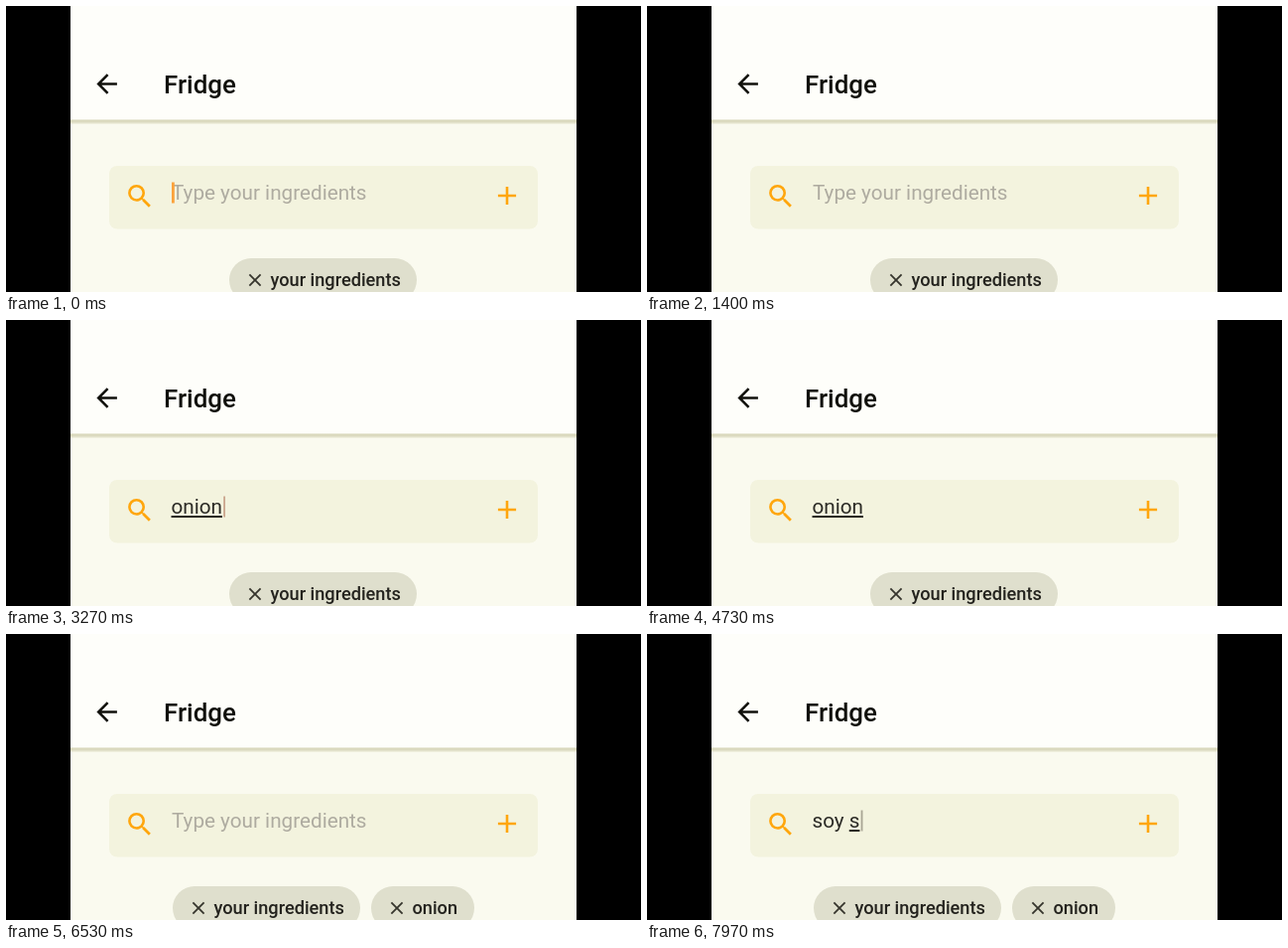
Animation of 640 by 288 pixels, one loop 8 s. Source, as an HTML page:

```html
<!DOCTYPE html>
<html lang="en">
<head>
<meta charset="utf-8">
<title>Fridge</title>
<style>
  html, body { margin: 0; width: 100%; height: 100%; overflow: hidden; background: #000; }
  svg { display: block; width: 100vw; height: 100vh; }
  text { font: 20.7px Roboto, sans-serif; white-space: pre; fill: #2c2b26; }
  .title { font-size: 25.9px; font-weight: 500; fill: #11110c; }
  .chip text { font-size: 18.2px; font-weight: 500; fill: #24231e; }
  .chip rect { fill: #dfdfcd; }
  .chip use { fill: #35342c; }
  .accent { fill: #ffa60d; }
  #hint { fill: #aeaba0; }
  #word { text-decoration: underline; }
</style>
</head>
<body>
<svg viewBox="0 0 640 288">
  <defs>
    <linearGradient id="shade" x2="0" y2="1">
      <stop offset="0" stop-color="#d6d5b8"/>
      <stop offset=".5" stop-color="#dddcc2"/>
      <stop offset="1" stop-color="#fafaef"/>
    </linearGradient>
    <path id="cross" d="M19 6.41 17.59 5 12 10.59 6.41 5 5 6.41 10.59 12 5 17.59 6.41 19 12 13.41 17.59 19 19 17.59 13.41 12z"/>
  </defs>
  <rect x="65" width="510" height="288" fill="#fafaef"/>
  <rect x="65" width="510" height="115" fill="#fefefa"/>
  <rect x="65" y="114.5" width="510" height="5" fill="url(#shade)"/>
  <path transform="translate(86.3 63.1) scale(1.28)" fill="#11110c"
    d="M20 11H7.83l5.59-5.59L12 4l-8 8 8 8 1.41-1.41L7.83 13H20z"/>
  <text class="title" x="159" y="88">Fridge</text>

  <rect x="104" y="161" width="432" height="63.5" rx="8" fill="#f3f3de"/>
  <path class="accent" transform="translate(119.2 176) scale(1.3)"
    d="M15.5 14h-.79l-.28-.27A6.47 6.47 0 0 0 16 9.5 6.5 6.5 0 1 0 9.5 16c1.61 0 3.09-.59 4.23-1.57l.27.28v.79l5 4.99L20.49 19zm-6 0a4.5 4.5 0 1 1 0-9 4.5 4.5 0 0 1 0 9z"/>
  <path class="accent" transform="translate(489.4 175.4) scale(1.3)" d="M19 13h-6v6h-2v-6H5v-2h6V5h2v6h6z"/>
  <text id="hint" x="167" y="195">Type your ingredients</text>
  <text x="166.5" y="195"><tspan id="done"></tspan><tspan id="word"></tspan></text>
  <rect id="caret" y="177.5" height="21"/>

  <g class="chip" id="first">
    <rect width="189" height="44" rx="22"/>
    <use href="#cross" transform="translate(15.3 11.3) scale(.89)"/>
    <text x="41.5" y="28">your ingredients</text>
  </g>
  <g class="chip" id="second" transform="translate(368 254)">
    <rect width="104" height="44" rx="22"/>
    <use href="#cross" transform="translate(15.3 11.3) scale(.89)"/>
    <text x="41.5" y="28">onion</text>
  </g>
</svg>
<script>
const LOOP = 8000, ADDED = 6530, HINT_GONE = 2300;
const $ = id => document.getElementById(id);
const [hint, done, word, caret, first, second] =
  ['hint', 'done', 'word', 'caret', 'first', 'second'].map($);

// time, finished text, underlined word being composed
const typing = [
  [0, '', ''], [2265, '', 'o'], [2500, '', 'on'], [2700, '', 'oni'],
  [2900, '', 'onio'], [3165, '', 'onion'], [ADDED, '', ''],
  [7265, '', 's'], [7450, '', 'so'], [7600, '', 'soy'],
  [7770, 'soy ', ''], [7930, 'soy ', 's']
];
// the caret blinks, and is gone from submitting until the next key
const hidden = [
  [70, 570], [1070, 1570], [2070, 2265], [3700, 4200],
  [4730, 5200], [5730, 6200], [ADDED, 7265]
];

function draw(t) {
  const [, before, current] = typing.findLast(step => step[0] <= t);
  const typed = before + current;
  const added = t >= ADDED;
  done.textContent = before;
  word.textContent = current;
  hint.setAttribute('opacity', typed && t >= HINT_GONE ? 0 : 1);

  const width = done.parentNode.getComputedTextLength();
  const thin = typed.length > 1;
  caret.setAttribute('x', typed ? 167.7 + width : 167);
  caret.setAttribute('width', thin ? 1.8 : 2.8);
  caret.setAttribute('fill', !thin ? '#fba23c' : added ? '#a9a695' : '#cba58d');
  caret.setAttribute('opacity', hidden.some(([a, b]) => t >= a && t < b) ? 0 : 1);

  first.setAttribute('transform', `translate(${added ? 168 : 225} 254)`);
  second.setAttribute('opacity', added ? 1 : 0);
}

function tick() {
  draw(performance.now() % LOOP);
  requestAnimationFrame(tick);
}
tick();
</script>
</body>
</html>
```
